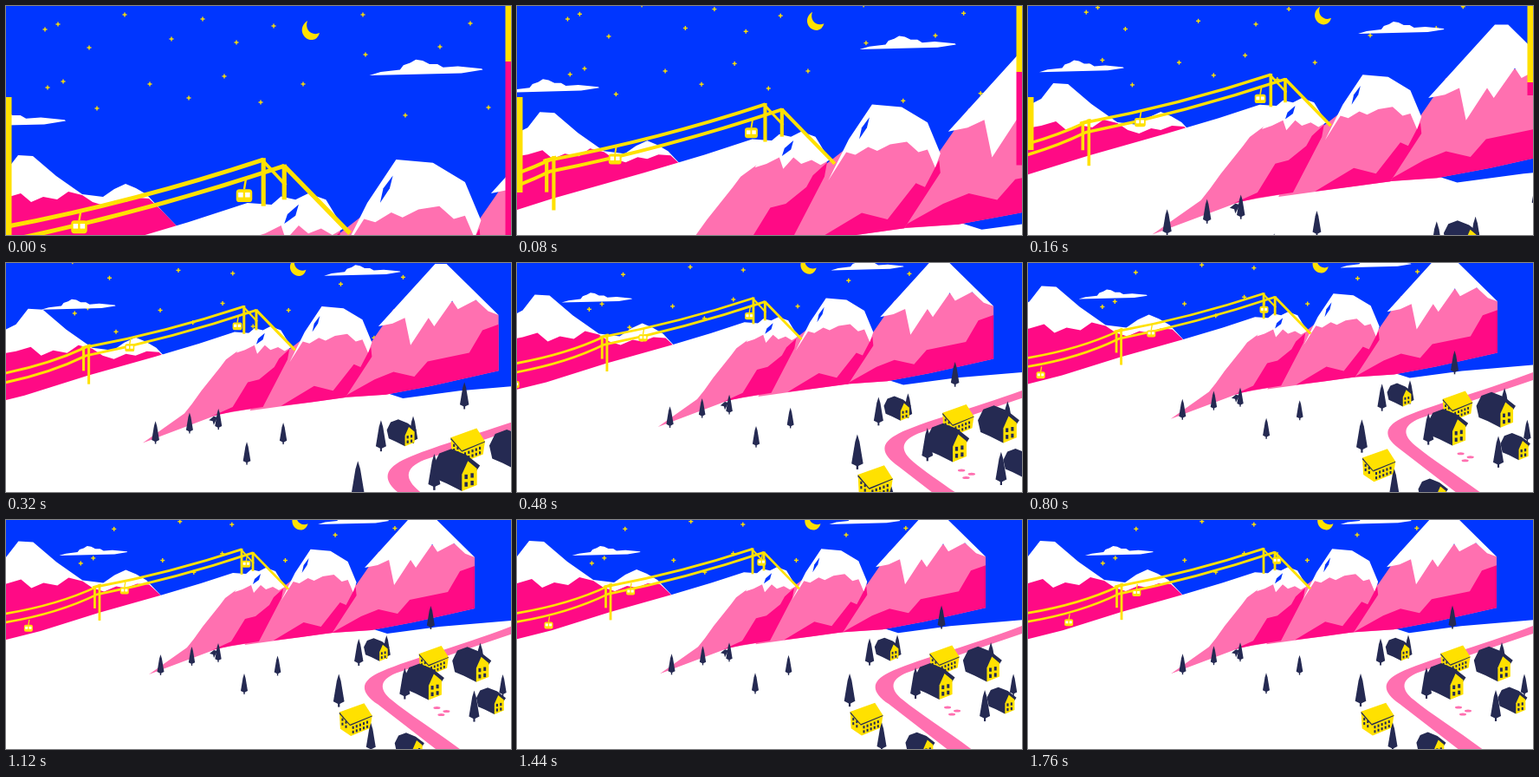
Write an HTML page with a canvas that moves like this. It is 583 px wide and 264 px high and loops after 1840 ms.

```html
<!DOCTYPE html>
<html lang="en">
<head>
<meta charset="utf-8">
<title>Ski village at night</title>
<style>
html, body { margin: 0; width: 100%; height: 100%; overflow: hidden; background: #0036ff; }
canvas { display: block; width: 583px; height: 264px; }
</style>
</head>
<body>
<canvas id="stage" width="583" height="264"></canvas>
<script>
const ctx = document.getElementById('stage').getContext('2d');
const LOOP = 1840, STEP = 80;
const BLUE = '#0036ff', YELLOW = '#ffe100', HOT = '#ff0a85', PINK = '#ff70b0', NAVY = '#252a52', WHITE = '#fff';
const STARS = '45,27 60,21 96,48 137,10 191,38 227,15 266,42 309,23 48,94 66,87 105,118 166,90 211,106 252,81 294,111 343,90 415,56 412,10 461,126 501,47 536,20 557,117';

// What is left of the opening camera move: the rate applies every 160 ms.
const decay = (t, rate) => Math.pow(rate, t / 160);
const place = (s, x, y) => ctx.setTransform(s, 0, 0, s, x, y);

function groundLayer(t, shift = 0) {
  const zoom = decay(t, 0.33);
  const pan = 0.85 * decay(t, 0.26) + 0.15 * decay(t, 0.65);
  place(1 + 0.85 * zoom, -206 * zoom + shift, 116 * pan);
}
function villageLayer(t) {
  const k = decay(t, 0.4);
  place(1 + k, -245 * k, 143 * k);
}
function farLayer(t) {
  place(1, t / 4 * decay(t, 0.38), 148 * decay(t, 0.44));
}

const points = text => text.split(' ').map(p => p.split(',').map(Number));
function path(text) {
  ctx.beginPath();
  for (const [x, y] of points(text)) ctx.lineTo(x, y);
}
function poly(color, text) {
  path(text);
  ctx.fillStyle = color;
  ctx.fill();
}
function stroke(width) {
  ctx.strokeStyle = YELLOW;
  ctx.lineWidth = width;
  ctx.stroke();
}
function line(text, width = 2.8) {
  path(text);
  stroke(width);
}
function rect(color, x, y, w, h) {
  ctx.fillStyle = color;
  ctx.fillRect(x, y, w, h);
}
function at(x, y, s, draw) {
  ctx.save();
  ctx.translate(x, y);
  ctx.scale(s, s);
  draw();
  ctx.restore();
}

function drawStars(t) {
  const k = decay(t, 0.43);
  for (const [x, y] of points(STARS)) {
    const endX = 0.8 * x + 48, endY = 0.86 * y - 31;
    at(endX + (x - endX) * k, endY + (y - endY) * k, 1, () => {
      rect(YELLOW, -2.5, -0.7, 5, 1.4);
      rect(YELLOW, -0.7, -2.5, 1.4, 5);
    });
  }
}

function drawMoon() {
  ctx.beginPath();
  ctx.moveTo(-3, -11);
  ctx.bezierCurveTo(-15, -3, -8, 12, 3, 11);
  ctx.quadraticCurveTo(9, 10, 11, 3);
  ctx.bezierCurveTo(3, 7, -7, 0, -3, -11);
  ctx.fillStyle = YELLOW;
  ctx.fill();
}

function drawCloud() {
  poly(WHITE, '-50,0 -40,-3 -23,-5 -20,-9 -14,-11 -9,-14 -3,-13 3,-10 10,-10 15,-7 28,-8 49,-6 50,-5 31,-2');
}

function drawSky(t) {
  const k = decay(t, 0.36), sec = t / 1000;
  place(1, 0, 0);
  rect(BLUE, 0, 0, 583, 264);
  drawStars(t);
  at(332 + 19 * k + 6 * sec, 1.5 + 26.5 * k, 0.9 + 0.1 * k, drawMoon);
  at(93 - 89.5 * k + 7 * sec, 41 + 98 * k, 0.79 + 0.52 * k, drawCloud);
  at(400 + 85 * k + sec, 5 + 75 * k, 0.82 + 0.49 * k, drawCloud);
}

function drawFar() {
  poly(WHITE, '-40,62 0,42 14,24 31,25 58,48 88,69 112,72 125,63 138,57 150,62 162,69 180,88 240,150 240,260 -40,260');
  poly(HOT, '-40,80 0,73 17,68 29,78 43,72 59,75 72,66 88,70 100,78 113,82 127,76 138,78 151,73 165,74 180,88 240,150 240,260 -40,260');
}

function drawGround() {
  poly(WHITE, '-200,205 0,137 40,127 107,106 178,86 225,72 262,60 290,62 310,110 415,122 440,130 500,122 583,115 700,106 700,700 -200,700');
}

function drawBigMountain() {
  poly(PINK, '418,54 400,80 365,130 422,126 470,117 541,101 541,42 515,25 430,36');
  poly(HOT, '376,129 410,110 430,102 452,107 466,91 510,82 524,58 541,52 541,101 470,117 422,126');
  poly(WHITE, '414,54 474,-12 486,-12 541,42 530,38 517,26 498,36 492,27 473,54 467,45 448,74 442,45 429,51');
}

function drawMidMountain() {
  poly(PINK, '335,64 308,85 275,143 340,134 376,129 404,85 403,70 374,52');
  poly(HOT, '308,138 343,117 363,122 385,94 392,97 403,76 404,86 376,129 340,134');
  poly(WHITE, '351,33 374,35 394,47 404,71 400,82 394,68 387,70 378,62 365,64 355,69 348,66 338,72 331,70 317,92 333,60');
  poly(BLUE, '349,43 343,51 341,60 347,51');
}

function drawNearMountain() {
  poly(PINK, '165,177 209,146 217,136 227,122 247,97 253,89 268,78 280,70 320,77 318,89 292,139 245,147');
  poly(HOT, '238,149 260,139 276,113 288,110 304,97 309,88 320,78 318,89 292,139 260,144');
  poly(WHITE, '264,82 276,62 283,56 292,58 300,54 311,58 322,76 315,80 308,76 300,79 294,74 286,83 283,74 273,79');
  poly(BLUE, '294,61 287,67 285,73 292,68');
}

function drawCable(left, tower, topX, topY) {
  ctx.beginPath();
  ctx.moveTo(-200, left + 52);
  ctx.lineTo(0, left);
  ctx.quadraticCurveTo(60, left - 10, 105, tower);
  ctx.quadraticCurveTo((105 + topX) / 2, (tower + topY) / 2 + 6, topX, topY);
  stroke(2.7);
}

function drawLift() {
  drawCable(107, 76, 272, 33);
  drawCable(117, 85, 285, 37);
  line('272,34 286,49', 2);
  line('285,37 326,79');
  line('272,32 272,62');
  line('285,36 285,58');
  line('102.5,75 102.5,101');
  line('108,73 108,115');
  line('100,77 110,74');
}

function drawGondola(x, y) {
  at(x, y, 1, () => {
    line('1,-10 0,-4', 1.3);
    ctx.beginPath();
    ctx.roundRect(-5, -4, 10, 8, 2);
    ctx.fillStyle = YELLOW;
    ctx.fill();
    rect(WHITE, -3.7, -2, 3, 3);
    rect(WHITE, 0.6, -2, 3, 3);
  });
}

function drawGondolas(t) {
  const sec = t / 1000;
  drawGondola(260 + 15.5 * sec, 55.5 - 5 * sec);
  drawGondola(157 - 18 * sec, 75 + 5 * sec);
  drawGondola(-11 + 33 * sec, 134 - 9 * sec);
}

function drawTree(x, y, h) {
  at(x, y, h / 24, () => {
    rect(NAVY, -0.7, 8, 1.4, 4);
    poly(NAVY, '0,-12 1.5,-7 4,8 0,10 -4,8 -1.5,-7');
  });
}
const drawTrees = text => text.split(' ').forEach(tree => drawTree(...tree.split(',').map(Number)));

function drawWindows(cols, rows, x, y, slope) {
  for (let c = 0; c < cols; c++) {
    for (let r = 0; r < rows; r++) rect(NAVY, x + c * 4, y + r * 5 + c * slope, 2, 3);
  }
}

function drawCabin(x, y, s) {
  at(x, y, s, () => {
    poly(NAVY, '-16,-3 -12,-11 -4,-14 6,-10 15,-3 13,0 3,14 -7,9 -14,6');
    poly(YELLOW, '3,3 7,-6 13,-1 13,10 3,14');
    drawWindows(2, 2, 4.8, 3, -0.9);
  });
}

function drawInn(x, y, s) {
  at(x, y, s, () => {
    poly(YELLOW, '-18,-9 10,-19 19,-5 17,9 -5,18 -17,10');
    poly(NAVY, '-18,-9 -6,5 -6,6.5 -18,-7');
    poly(NAVY, '-6,5 19,-5 19,-4 -6,6.5');
    drawWindows(5, 2, -3.5, 7, -1.5);
    drawWindows(2, 2, -15.5, -2, 3);
  });
}

function drawRoad() {
  ctx.beginPath();
  ctx.moveTo(700, 82);
  ctx.lineTo(583, 122);
  ctx.bezierCurveTo(520, 146, 455, 163, 429, 176);
  ctx.bezierCurveTo(407, 187, 410, 199, 429, 212);
  ctx.lineTo(512, 276);
  ctx.lineTo(540, 276);
  ctx.bezierCurveTo(506, 249, 468, 226, 445, 207);
  ctx.bezierCurveTo(428, 193, 433, 183, 450, 176);
  ctx.lineTo(583, 131);
  ctx.lineTo(700, 92);
  ctx.fillStyle = PINK;
  ctx.fill();
  for (const [x, y] of points('497,216 508,220 502,224')) {
    ctx.beginPath();
    ctx.ellipse(x, y, 4, 1.5, 0, 0, 7);
    ctx.fill();
  }
}

function drawVillage() {
  drawRoad();
  drawTrees('407,152,31 439,146,27 490,112,27');
  drawCabin(428, 149, 0.95);
  drawInn(493, 162, 0.92);
  drawTrees('460,188,36 547,160,38');
  drawCabin(483, 186, 1.5);
  drawCabin(538, 166, 1.45);
  drawTrees('384,196,38 573,190,25');
  drawCabin(560, 208, 1.1);
  drawTree(540, 214, 36);
  drawInn(403, 230, 1.02);
  drawTree(421, 250, 33);
  drawCabin(466, 260, 1.1);
}

function drawEdges(t) {
  const u = t / 160;
  if (u > 1) return;
  const split = 64 + 24 * u;
  rect(YELLOW, 0, 105, 6.5, 159 - 98 * u);
  rect(YELLOW, 576.5, 0, 6.5, split);
  rect(HOT, 576.5, split, 6.5, 200 - 185 * u);
}

function draw(t) {
  drawSky(t);
  farLayer(t);
  drawFar();
  groundLayer(t);
  drawGround();
  drawBigMountain();
  groundLayer(t, 7 * decay(t, 0.7));
  drawMidMountain();
  groundLayer(t);
  drawNearMountain();
  drawLift();
  drawGondolas(t);
  drawTrees('178.5,166,24 214.5,156,22 245,152,22 275,188,24 313.5,167,23');
  poly(NAVY, '235,153 240,149 244,150 242,154 240,158 239,154');
  villageLayer(t);
  drawVillage();
  place(1, 0, 0);
  drawEdges(t);
}

const start = performance.now();
function tick() {
  const t = (performance.now() - start) % LOOP;
  draw(Math.floor(t / STEP) * STEP);
  requestAnimationFrame(tick);
}
tick();
</script>
</body>
</html>
```
